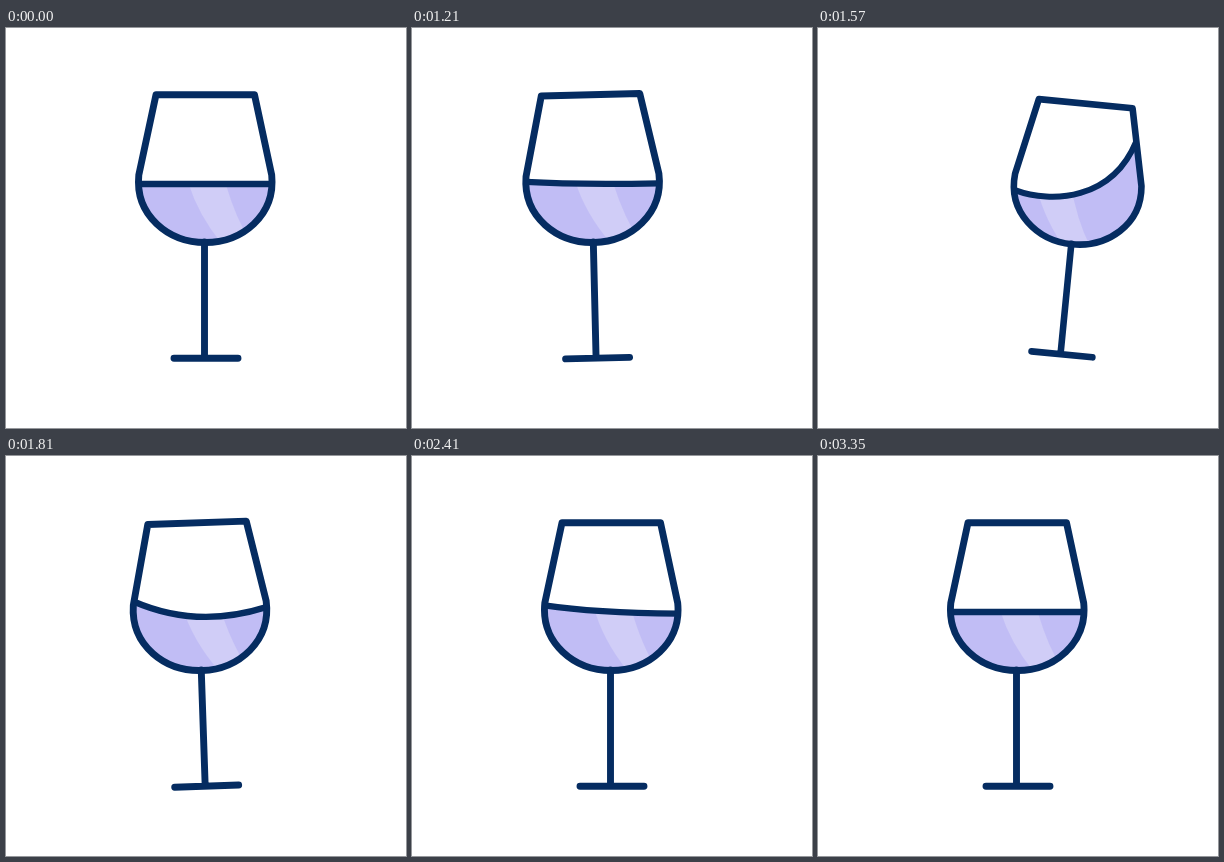
An HTML page for the animation above (3410 ms loop, 400x400 px).

```html
<!DOCTYPE html>
<html lang="en">
<head>
<meta charset="utf-8">
<title>Wine glass</title>
<style>
  html, body { margin: 0; width: 100%; height: 100%; overflow: hidden; background: #fff; }
  svg { display: block; width: 100vw; height: 100vh; }
  .line { fill: none; stroke: #052c61; stroke-width: 6.9; stroke-linecap: round; stroke-linejoin: round; }
</style>
</head>
<body>
<svg viewBox="0 0 400 400">
  <defs>
    <path id="bowl" d="M150 66.700H248.500L265.700 147C269.700 187.500 236 214.500 199.300 214.500S128.800 187.500 132.800 147Z"/>
    <clipPath id="inBowl"><use href="#bowl"/></clipPath>
    <clipPath id="inWine"><path id="wineClip"/></clipPath>
  </defs>
  <g id="glass">
    <g clip-path="url(#inBowl)">
      <path id="wine" fill="#c1bdf5"/>
      <g clip-path="url(#inWine)">
        <path id="shine" fill="#d0cdf7" d="M181 150Q190 184 216 216H246Q229 190 218 150L200 60H160Z"/>
      </g>
      <path id="surface" class="line" style="stroke-width:6.3"/>
    </g>
    <use href="#bowl" class="line"/>
    <path class="line" d="M198.500 214V330M168 330.200H232"/>
  </g>
</svg>
<script>
const LOOP = 3410, STEP = 20;
const START = 1070, CALM = 2250, END = 3350;
const CENTER = 199.3, LEVEL = 156, WAVE = 75, PERIOD = 600;

const poses = [
  { at: 1066, x: 0, tilt: 0 },
  { at: 1130, x: 7, tilt: 1.6 },
  { at: 1330, x: -64, tilt: -7 },
  { at: 1605, x: 61, tilt: 6.1 },
  { at: 1830, x: -5, tilt: -2.1 },
  { at: 1920, x: 0, tilt: 0 }
];

const $ = id => document.getElementById(id);
const clamp = u => Math.min(1, Math.max(0, u));
const mix = (a, b, u) => a + (b - a) * u;
const ease = u => (1 - Math.cos(Math.PI * clamp(u))) / 2;
const arch = (t, from, to) => Math.sin(Math.PI * clamp((t - from) / (to - from)));

function swing(t) {
  const next = poses.findIndex(p => p.at > t);
  if (next < 1) return poses[0];
  const a = poses[next - 1], b = poses[next];
  const u = ease((t - a.at) / (b.at - a.at));
  return { x: mix(a.x, b.x, u), tilt: mix(a.tilt, b.tilt, u) };
}

// Wave that grows with the swing and then dies away; positive is high on the left
function lean(t) {
  const grow = clamp((t - START) / 300);
  const fade = clamp((END - t) / (END - CALM)) ** 1.15;
  return WAVE * grow * fade * Math.sin(2 * Math.PI * (t - 1200) / PERIOD);
}

function halfWidth(y) {
  return y < 147 ? 49.2 + (y - 66.7) * 0.214 : 66.7 * Math.sqrt(1 - ((y - 150) / 64.5) ** 2);
}

function render(t) {
  const { x, tilt } = swing(t);
  const away = arch(t, 1310, 1630);
  $('glass').setAttribute('transform',
    `translate(${199.75 + x} ${200 + 4.5 * away}) rotate(${tilt}) scale(${1 - 0.08 * away}) translate(-199.75 -200)`);

  const s = lean(t), bow = arch(t, 1370, 1990);
  const hiL = Math.max(s, 0), hiR = Math.max(-s, 0);
  const yl = LEVEL - hiL + 0.26 * hiR - 6 * bow;
  const yr = LEVEL - hiR + 0.26 * hiL - 6 * bow;
  const y1 = LEVEL + 0.2 * hiR + 10 * bow;
  const y2 = LEVEL + 0.2 * hiL + 10 * bow;

  // Handles crowd towards the high wall
  const xl = CENTER - halfWidth(yl), xr = CENTER + halfWidth(yr);
  const x1 = mix(xl, xr, 0.33 - 0.38 * (hiL / WAVE) ** 2);
  const x2 = mix(xl, xr, 0.67 + 0.38 * (hiR / WAVE) ** 2);

  const top = `M${xl} ${yl}C${x1} ${y1} ${x2} ${y2} ${xr} ${yr}`;
  const body = `${top}H275V222H125V${yl}Z`;
  $('surface').setAttribute('d', top);
  $('wine').setAttribute('d', body);
  $('wineClip').setAttribute('d', body);
  $('shine').setAttribute('transform', `translate(${0.8 * s * Math.abs(s) / WAVE} 0)`);
}

const start = performance.now();
function tick() {
  const t = (performance.now() - start) % LOOP;
  render(Math.floor((t - 10) / STEP) * STEP + 10);
  requestAnimationFrame(tick);
}
tick();
</script>
</body>
</html>
```
